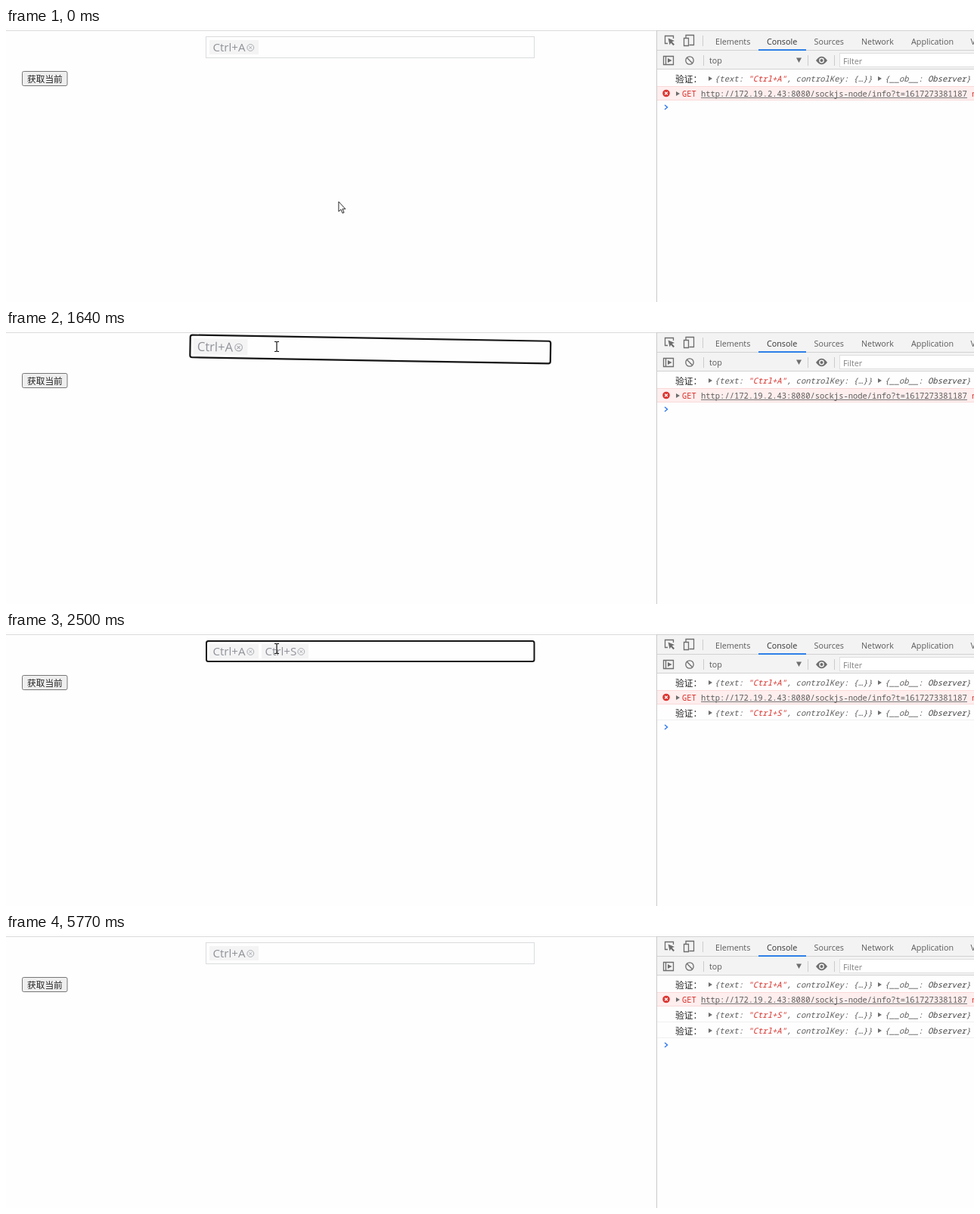
Recreate the animation shown at these times as an HTML page. Size 1280 by 363 pixels, loop 5890 ms.

```html
<!DOCTYPE html>
<html lang="zh-CN">
<head>
<meta charset="utf-8">
<style>
html, body { margin: 0; width: 100%; height: 100%; overflow: hidden; background: #fefefe; }
svg { display: block; width: 1280px; height: 363px; }
text { white-space: pre; }
.ui { font: 10.75px "Open Sans", "Noto Sans", sans-serif; fill: #5a5a5a; }
.zh { font: 11.7px "Noto Sans CJK SC", "Noto Sans CJK", sans-serif; fill: #222; }
.mono { font: 10.48px "Noto Sans Mono", monospace; fill: #5c5c5c; }
.obj { font-style: italic; font-size: 10.55px; }
.red { fill: #d8302a; }
.tag { font: 15.1px "Open Sans", "Noto Sans", sans-serif; fill: #909298; }
.icon { fill: none; stroke: #6e6e6e; stroke-width: 1.3; }
.solid { fill: #6e6e6e; }
</style>
</head>
<body>
<svg viewBox="0 0 1280 363">
  <rect y="3" width="861" height="1" fill="#dcdcdc"/>
  <rect x="21.5" y="57.5" width="59.5" height="19" rx="2" fill="#efefef" stroke="#767676"/>
  <text class="zh" x="28" y="72">获取当前</text>

  <g id="box">
    <rect id="field" fill="#fefefe"/>
    <g id="tags"></g>
  </g>

  <rect x="861" y="3" width="419" height="52" fill="#f3f3f3"/>
  <path d="M861 3.5H1280M861 29.5H1280M861 54.5H1280" stroke="#d2d2d2"/>
  <path d="M860.5 3V363" stroke="#cacaca"/>
  <path d="M921.5 10V24M922.5 36V50M1060.5 36V50M1095.5 36V50" stroke="#ccc"/>
  <rect x="995" y="28.2" width="63" height="1.8" fill="#1a73e8"/>
  <g class="ui">
    <text x="938" y="21.7">Elements</text>
    <text x="1006" y="21.7" fill="#333">Console</text>
    <text x="1068.5" y="21.7">Sources</text>
    <text x="1131" y="21.7">Network</text>
    <text x="1197" y="21.7">Application</text>
    <text x="1275.5" y="21.7">V</text>
    <text x="930" y="46.7">top</text>
  </g>
  <rect x="1102.5" y="33.5" width="190" height="18" fill="#fff" stroke="#dedede"/>
  <text class="ui" x="1107" y="47.5" style="fill:#808080">Filter</text>

  <path class="icon" d="M875 20.5H871.5V10.5H882.5V14"/>
  <path class="solid" d="M875.5 13.5L884 17L880.7 18.3L884 21.8L882.4 23.3L879.2 19.8L877.6 22.5Z"/>
  <path class="icon" d="M899 13V9.5H909.5V22.5H903.5M896.5 13.5H902.5V23.5H896.5Z"/>
  <path class="icon" d="M869.5 37.5H882.5V48.5H869.5ZM872.5 37.5V48.5"/>
  <path class="solid" d="M875 40L880.5 43L875 46Z"/>
  <circle class="icon" cx="904" cy="43" r="5.2"/>
  <path class="icon" d="M900.3 39.3L907.7 46.7"/>
  <path class="solid" d="M1045 39.5H1052L1048.5 46Z"/>
  <path class="solid" d="M1071 43Q1078.5 32.5 1086 43Q1078.5 53.5 1071 43Z"/>
  <circle cx="1078.5" cy="43" r="3.4" fill="#f3f3f3"/>
  <circle class="solid" cx="1078.5" cy="43" r="2"/>

  <rect x="861" y="77" width="419" height="19" fill="#feeeee"/>
  <path d="M861 77.5H1280M861 95.5H1280" stroke="#fbd9d9"/>
  <circle cx="873" cy="86.5" r="4.8" fill="#dc3530"/>
  <path d="M871.2 84.7L874.8 88.3M874.8 84.7L871.2 88.3" stroke="#fff" stroke-width="1.3"/>
  <path class="solid" d="M886 84L891 87L886 90Z"/>
  <g class="mono">
    <text class="red" x="894" y="91">GET</text>
    <text x="919" y="91">http://172.19.2.43:8080/sockjs-node/info?t=1617273381187</text>
    <text class="red" x="1277" y="91">net</text>
  </g>
  <path d="M919 92.5H1271" stroke="#777"/>
  <g id="log"></g>
  <path id="prompt" fill="none" stroke="#367cf1" stroke-width="1.5"/>

  <path id="arrow" d="M.5 .5V13.5L3.5 10.8L5.6 15.7L7.6 14.8L5.5 10.2H9.5Z" fill="#fff" stroke="#111" stroke-width=".9"/>
  <path id="beam" d="M-3 -6.5H-1L0 -5.8L1 -6.5H3M0 -6V6M-3 6.5H-1L0 5.8L1 6.5H3" fill="none" stroke="#111" stroke-width="1.2"/>
</svg>
<script>
const LOOP = 5890, SHAKE = 1422, SHAKE_MS = 750;
const $ = id => document.getElementById(id);
const set = (el, attrs) => { for (const k in attrs) el.setAttribute(k, attrs[k]); };
const show = (el, on) => el.style.display = on ? '' : 'none';
const clamp = x => Math.max(0, Math.min(1, x));
const mix = (a, b, k) => a + (b - a) * k;

const tag = (x, w, key, cx) => `<g><rect x="${x}" y="16" width="${w}" height="19" fill="#f4f4f5"/>
  <text class="tag" x="${x + 4.5}" y="31.2">${key}</text>
  <g fill="none" stroke="#a9abb0"><circle cx="${cx}" cy="26" r="4.4"/>
  <path d="M${cx - 1.8} 24.2l3.6 3.6m0 -3.6l-3.6 3.6"/></g></g>`;
$('tags').innerHTML = tag(269, 65, 'Ctrl+A', 323.3) + tag(338, 62, 'Ctrl+S', 390.3);

const row = (y, key) => `<g><text class="zh" x="885" y="${y + 4.5}">验证：</text>
  <path class="solid" d="M929 ${y - 3}l5 3l-5 3zM1153 ${y - 3}l5 3l-5 3z"/>
  <g class="mono obj"><text x="937" y="${y + 4}">{text: <tspan class="red">"${key}"</tspan>, controlKey: {…}}</text>
  <text x="1162" y="${y + 4}">{__ob__: <tspan fill="#444">Observer</tspan>}</text></g>
  ${y > 100 ? `<path d="M861 ${y + 9.5}H1280" stroke="#f0f0f0"/>` : ''}</g>`;
$('log').innerHTML = row(67, 'Ctrl+A') + row(107, 'Ctrl+S') + row(128, 'Ctrl+A');

// CSS "ease": cubic-bezier(.25, .1, .25, 1)
function ease(x) {
  let lo = 0, hi = 1, u;
  for (let i = 0; i < 16; i++) {
    u = (lo + hi) / 2;
    if (.75 * u * (1 - u) + u ** 3 < x) lo = u; else hi = u;
  }
  return .3 * u * (1 - u) ** 2 + 3 * u * u * (1 - u) + u ** 3;
}
const smooth = x => x * x * (3 - 2 * x);

const SCALES = [1, .9, .9, 1.1, 1.1, 1.1, 1.1, 1.1, 1.1, 1.1, 1];
const TURNS = [0, -1, -1, 1, -1, 1, -1, 1, -1, 1, 0];
function shake(t) {
  const p = clamp((t - SHAKE) / SHAKE_MS) * 10;
  const i = Math.min(9, Math.floor(p)), k = ease(p - i);
  const at = list => mix(list[i], list[i + 1], k);
  return p > 0 && p < 10
    ? `translate(481.5 25.5) rotate(${at(TURNS)}) scale(${at(SCALES)}) translate(-481.5 -25.5)` : '';
}

const bezier = (a, b, c, d, u) =>
  a * (1 - u) ** 3 + 3 * b * u * (1 - u) ** 2 + 3 * c * u * u * (1 - u) + d * u ** 3;

function pointer(t) {
  if (t < 4490) {
    const k = smooth(clamp((t - 10) / 580));
    return [mix(439.4, 358, k), mix(229.6, 22, k)];
  }
  if (t < 5100) {
    const u = smooth(clamp((t - 4490) / 610));
    return [bezier(358, 70, 120, 667, u), bezier(22, 90, 155, 284, u)];
  }
  const k = clamp((t - 5100) / 180);
  return [mix(667, 714, k), mix(284, 366, k)];
}

function draw(now) {
  const t = now % LOOP;
  const focus = t >= 600 && t < 5770;
  set($('field'), focus
    ? { x: 265, y: 12, width: 433.5, height: 27, rx: 2.5, stroke: '#151515', 'stroke-width': 2 }
    : { x: 264.5, y: 11.5, width: 434, height: 28, rx: 0, stroke: '#dadbdd', 'stroke-width': 1 });
  set($('box'), { transform: shake(t) });
  show($('tags').children[1], t >= 2500 && t < 3910);

  const rows = $('log').children;
  show(rows[1], t >= 2500);
  show(rows[2], t >= 3930);
  const y = t < 2500 ? 105 : t < 3930 ? 126 : 147;
  set($('prompt'), { d: `M871 ${y - 3}l3.5 3l-3.5 3` });

  const [px, py] = pointer(t);
  const inside = px > 264 && px < 699 && py > 11 && py < 40;
  show($('arrow'), !inside && t < 5280);
  show($('beam'), inside);
  set($(inside ? 'beam' : 'arrow'), { transform: `translate(${px} ${py})` });
  requestAnimationFrame(draw);
}
draw(0);
</script>
</body>
</html>
```
